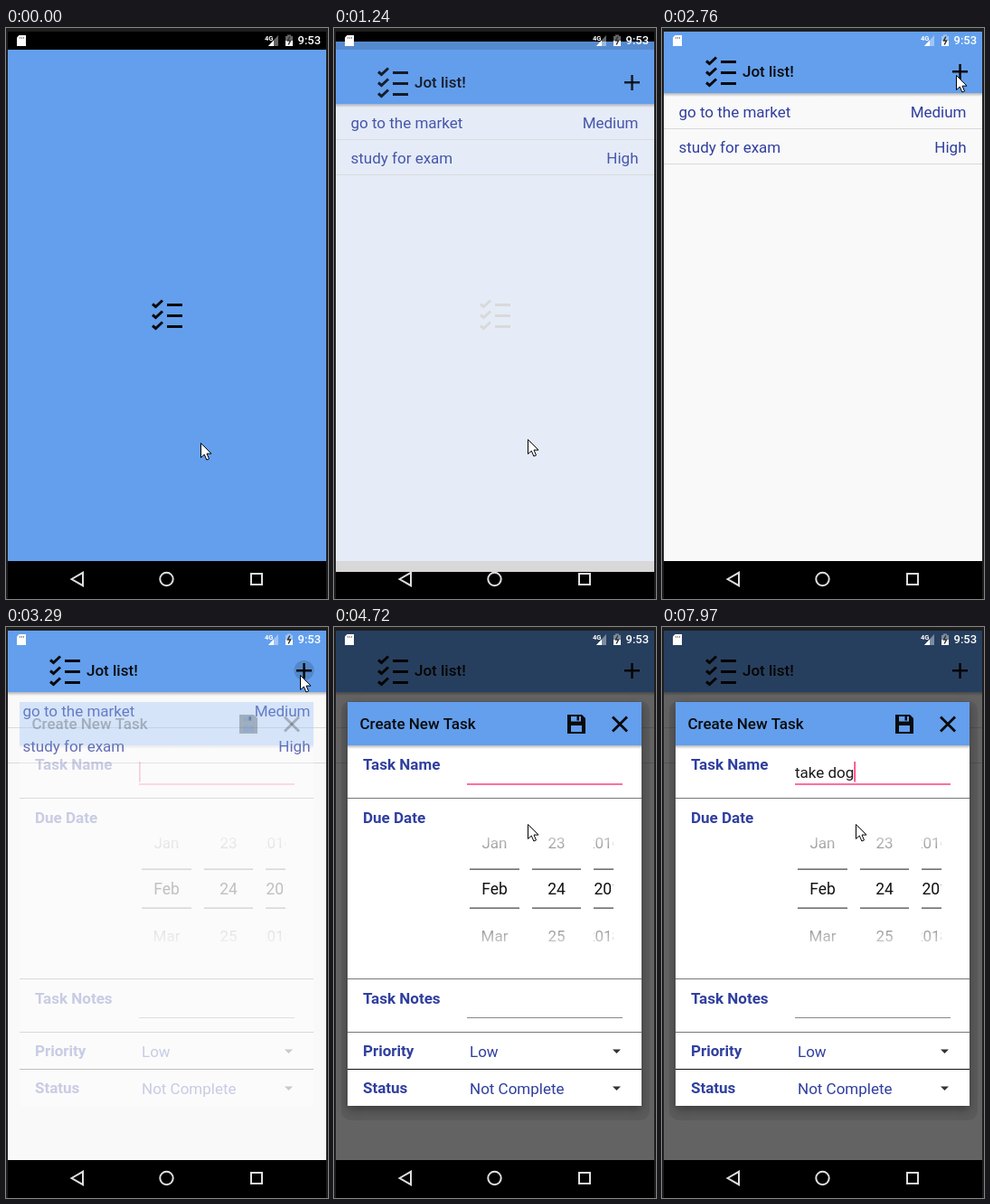
An HTML page with a canvas for the animation above (8 s loop, 356 px wide and 632 px high).

```html
<!DOCTYPE html>
<html lang="en">
<head>
<meta charset="utf-8">
<title>Task list app</title>
<style>
  html, body { margin: 0; width: 100%; height: 100%; overflow: hidden; background: #1e1e1e; }
  canvas { display: block; width: 356px; height: 632px; }
</style>
</head>
<body>
<canvas id="stage"></canvas>
<script>
const W = 356, H = 632, LOOP = 8000;
const LIST_IN = 1240, LIST_SETTLED = 1360, TAP = 3290, DIALOG_IN = 3440, FOCUS = 3800;
const KEY_GAP = 120, BLINK = 500;
const BLUE = '#639fed', INDIGO = '#303f9f', PINK = '#ff4081', PAPER = '#f9f9f9', INK = '#0a0a0a';

const canvas = document.getElementById('stage');
const ctx = canvas.getContext('2d');
const dpr = window.devicePixelRatio || 1;
canvas.width = W * dpr;
canvas.height = H * dpr;

// Stops of the pointer, joined by straight moves
const STOPS = [
  { t: 940, x: 215, y: 459 }, { t: 1360, x: 214, y: 453 }, { t: 1640, x: 208, y: 372 },
  { t: 2040, x: 250, y: 118 }, { t: 2460, x: 316, y: 72 }, { t: 2760, x: 325, y: 52 },
  { t: TAP, x: 325, y: 52 }, { t: DIALOG_IN, x: 259, y: 165 }, { t: FOCUS, x: 214, y: 218 }
];

// Bursts of typing; keys in a burst follow each other at KEY_GAP
const BURSTS = [[5120, 'ta'], [5850, 'ke'], [7300, ' '], [7700, 'dog']];

const clamp01 = v => Math.min(1, Math.max(0, v));
const lerp = (a, b, k) => a + (b - a) * k;

function pointerAt(t) {
  const i = Math.max(1, STOPS.findIndex(stop => stop.t > t));
  const last = STOPS.at(-1);
  if (t >= last.t) return last;
  const a = STOPS[i - 1], b = STOPS[i];
  const k = clamp01((t - a.t) / (b.t - a.t));
  return { x: Math.round(lerp(a.x, b.x, k)), y: Math.round(lerp(a.y, b.y, k)) };
}

function typedAt(t) {
  let name = '', lastKey = FOCUS;
  for (const [begin, keys] of BURSTS) {
    [...keys].forEach((key, i) => {
      const time = begin + i * KEY_GAP;
      if (time > t) return;
      name += key;
      lastKey = time;
    });
  }
  const caretOn = Math.max(0, t - lastKey) % (2 * BLINK) < BLINK;
  return { name, caretOn };
}

function rect(x, y, w, h, color) {
  ctx.fillStyle = color;
  ctx.fillRect(x, y, w, h);
}

function text(str, x, y, color, { weight = 400, size = 17, align = 'left' } = {}) {
  ctx.font = `${weight} ${size}px Roboto, sans-serif`;
  ctx.textAlign = align;
  ctx.fillStyle = color;
  ctx.fillText(str, x, y);
}

function trace(points, close) {
  ctx.beginPath();
  points.forEach(([x, y]) => ctx.lineTo(x, y));
  if (close) ctx.closePath();
}

function fillShape(points, color) {
  trace(points, true);
  ctx.fillStyle = color;
  ctx.fill();
}

function strokeShape(points, color, width, close = false) {
  trace(points, close);
  ctx.strokeStyle = color;
  ctx.lineWidth = width;
  ctx.stroke();
}

function disc(x, y, r, color) {
  ctx.beginPath();
  ctx.arc(x, y, r, 0, Math.PI * 2);
  ctx.fillStyle = color;
  ctx.fill();
}

function dropShade(x, y, w) {
  const shade = ctx.createLinearGradient(0, y, 0, y + 4);
  shade.addColorStop(0, 'rgba(0,0,0,.28)');
  shade.addColorStop(1, 'rgba(0,0,0,0)');
  rect(x, y, w, 4, shade);
}

function checklist(x, y) {
  for (let row = 0; row < 3; row++) {
    const top = y + row * 12;
    strokeShape([[x + 1, top + 5.5], [x + 4.5, top + 8.5], [x + 12, top + 1.5]], INK, 3);
    rect(x + 17, top + 5, 17, 3, INK);
  }
}

function statusIcons() {
  const white = '#fff', faint = 'rgba(255,255,255,.4)';
  fillShape([[14.5, 8], [22, 8], [22, 20], [12, 20], [12, 10.5]], white);
  for (let x = 15; x < 21; x += 2) rect(x, 10, 1, 2, '#888');
  text('4G', 286, 14, white, { weight: 700, size: 7.5 });
  fillShape([[301, 8], [301, 20], [290, 20]], faint);
  fillShape([[296, 13.5], [296, 20], [290, 20]], white);
  rect(309, 9, 8, 5, faint);
  rect(311, 7.5, 4, 1.5, faint);
  rect(309, 14, 8, 6, white);
  strokeShape([[313.8, 9.5], [311.5, 14], [314.5, 14], [312.2, 18.5]], '#333', 1.5);
  text('9:53', 322.5, 18, white, { weight: 500, size: 13 });
}

function navIcons() {
  const tone = '#dedede';
  strokeShape([[72.5, 610], [85, 602.8], [85, 617.2]], tone, 2, true);
  ctx.beginPath();
  ctx.arc(177.5, 610, 7.2, 0, Math.PI * 2);
  ctx.stroke();
  ctx.strokeRect(271, 604, 12, 12);
}

function splash() {
  rect(2, 24, 352, 566, BLUE);
  checklist(161, 300);
}

function listScreen(dy, alpha) {
  ctx.save();
  ctx.beginPath();
  ctx.rect(2, 4, 352, 598);
  ctx.clip();
  ctx.globalAlpha = alpha;
  ctx.translate(0, dy);
  rect(2, 72, 352, 518, PAPER);
  rect(2, 3, 352, 69, BLUE);
  dropShade(2, 72, 352);
  checklist(48, 31);
  text('Jot list!', 89, 54, INK, { weight: 500 });
  rect(321, 47, 17, 2.5, INK);
  rect(328.3, 40, 2.5, 17, INK);
  [['go to the market', 'Medium'], ['study for exam', 'High']].forEach(([task, level], i) => {
    const y = i * 39.5;
    text(task, 18.5, 98.5 + y, INDIGO);
    text(level, 336.5, 98.5 + y, INDIGO, { align: 'right' });
    rect(2, Math.floor(111 + y), 352, 1, '#d9d9d9');
  });
  ctx.restore();
}

function datePicker() {
  const fade = ctx.createLinearGradient(0, 215, 0, 366);
  ['#fff', '#505050', '#505050', '#fff'].forEach((color, i) => {
    fade.addColorStop([0, .35, .65, 1][i], color);
  });
  const columns = [
    { x: 150, w: 55, value: i => ['Jan', 'Feb', 'Mar'][i] },
    { x: 219, w: 54, value: i => 23 + i },
    { x: 287, w: 22, value: i => 2016 + i, cropped: true }
  ];
  for (const { x, w, value, cropped } of columns) {
    ctx.save();
    ctx.beginPath();
    ctx.rect(x, 215, w, 152);
    ctx.clip();
    for (let i = 0; i < 3; i++) {
      const current = i === 1;
      const left = cropped && current;
      text(value(i), left ? x + .5 : x + w / 2, Math.floor(245 + i * 51.5), current ? '#111' : fade,
        { align: left ? 'left' : 'center', size: current ? 17.5 : 17 });
    }
    rect(x, 267.3, w, 1.7, '#777');
    rect(x, 310.3, w, 1.7, '#777');
    ctx.restore();
  }
}

function saveIcon(x, y) {
  fillShape([[x, y], [x + 16, y], [x + 20, y + 4], [x + 20, y + 21], [x, y + 21]], INK);
  rect(x + 4, y + 2, 11, 5.5, BLUE);
  rect(x + 10.5, y + 2, 2.5, 4.5, INK);
  rect(x + 4, y + 12, 12, 7, BLUE);
}

function closeIcon(x, y, r) {
  strokeShape([[x - r, y - r], [x + r, y + r]], INK, 2.8);
  strokeShape([[x + r, y - r], [x - r, y + r]], INK, 2.8);
}

function dialogShadow() {
  ctx.save();
  ctx.beginPath();
  ctx.roundRect(8, 82, 341, 464, 10);
  ctx.fillStyle = 'rgba(0,0,0,.08)';
  ctx.fill();
  ctx.shadowColor = 'rgba(0,0,0,.35)';
  ctx.shadowBlur = 10 * dpr;
  ctx.shadowOffsetY = 4 * dpr;
  rect(15, 83, 325, 447, '#fff');
  ctx.restore();
}

function dialog(alpha, { name, caretOn }) {
  ctx.save();
  ctx.globalAlpha = alpha;
  ctx.beginPath();
  ctx.roundRect(15, 83, 325, 447, 2);
  ctx.fillStyle = '#fff';
  ctx.fill();

  rect(15, 83, 325, 48, BLUE);
  dropShade(15, 131, 325);
  text('Create New Task', 28.5, 113, INK, { weight: 500 });
  saveIcon(258, 97);
  closeIcon(316, 107.5, 8);

  const labels = { 'Task Name': 158, 'Due Date': 217, 'Task Notes': 417, Priority: 475, Status: 516 };
  for (const [label, y] of Object.entries(labels)) text(label, 32, y, INDIGO, { weight: 700 });
  for (const y of [189, 389, 448, 489]) rect(15, y, 325, 1, y === 489 ? '#111' : '#777');

  rect(147, 173, 172, 2, '#ff6f9f');
  text(name, 147, 167, '#1a1a1a');
  if (caretOn) rect(147 + ctx.measureText(name).width, 149, 1.7, 22.5, PINK);
  rect(147, 432, 172, 1, '#888');

  datePicker();
  ['Low', 'Not Complete'].forEach((value, i) => {
    const y = 476 + i * 41;
    text(value, 150, y, INDIGO);
    fillShape([[308, y - 8.5], [317, y - 8.5], [312.5, y - 4]], '#333');
  });
  ctx.restore();
}

function pointer({ x, y }) {
  const outline = [[0, 0], [0, 16], [3.8, 12.6], [6.4, 18.5], [9, 17.4], [6.5, 11.6], [11.5, 11.6]]
    .map(([px, py]) => [x + .5 + px, y + .5 + py]);
  fillShape(outline, '#fff');
  strokeShape(outline, '#000', 1, true);
}

function draw(t) {
  ctx.setTransform(dpr, 0, 0, dpr, 0, 0);
  rect(0, 0, W, H, '#1e1e1e');
  rect(2, 4, 352, 628, '#000');

  if (t < LIST_SETTLED) splash();
  if (t >= LIST_IN) {
    const entering = t < LIST_SETTLED;
    listScreen(entering ? 12 : t < 1520 ? 1 : 0, entering ? .87 : 1);
  }
  const ripple = (t - TAP) / 400;
  if (ripple >= 0 && ripple < 1) {
    disc(329.5, 48, Math.min(17, 11 + ripple * 16), `rgba(0,0,0,${.15 * (1 - ripple)})`);
  }
  const open = t >= DIALOG_IN;
  if (open) {
    rect(2, 4, 352, 586, 'rgba(0,0,0,.6)');
    dialogShadow();
  }
  if (t >= TAP) dialog(open ? 1 : .25, typedAt(t));
  navIcons();
  statusIcons();
  pointer(pointerAt(t));
}

const start = performance.now();
function tick() {
  draw((performance.now() - start) % LOOP);
  requestAnimationFrame(tick);
}
tick();
</script>
</body>
</html>
```
